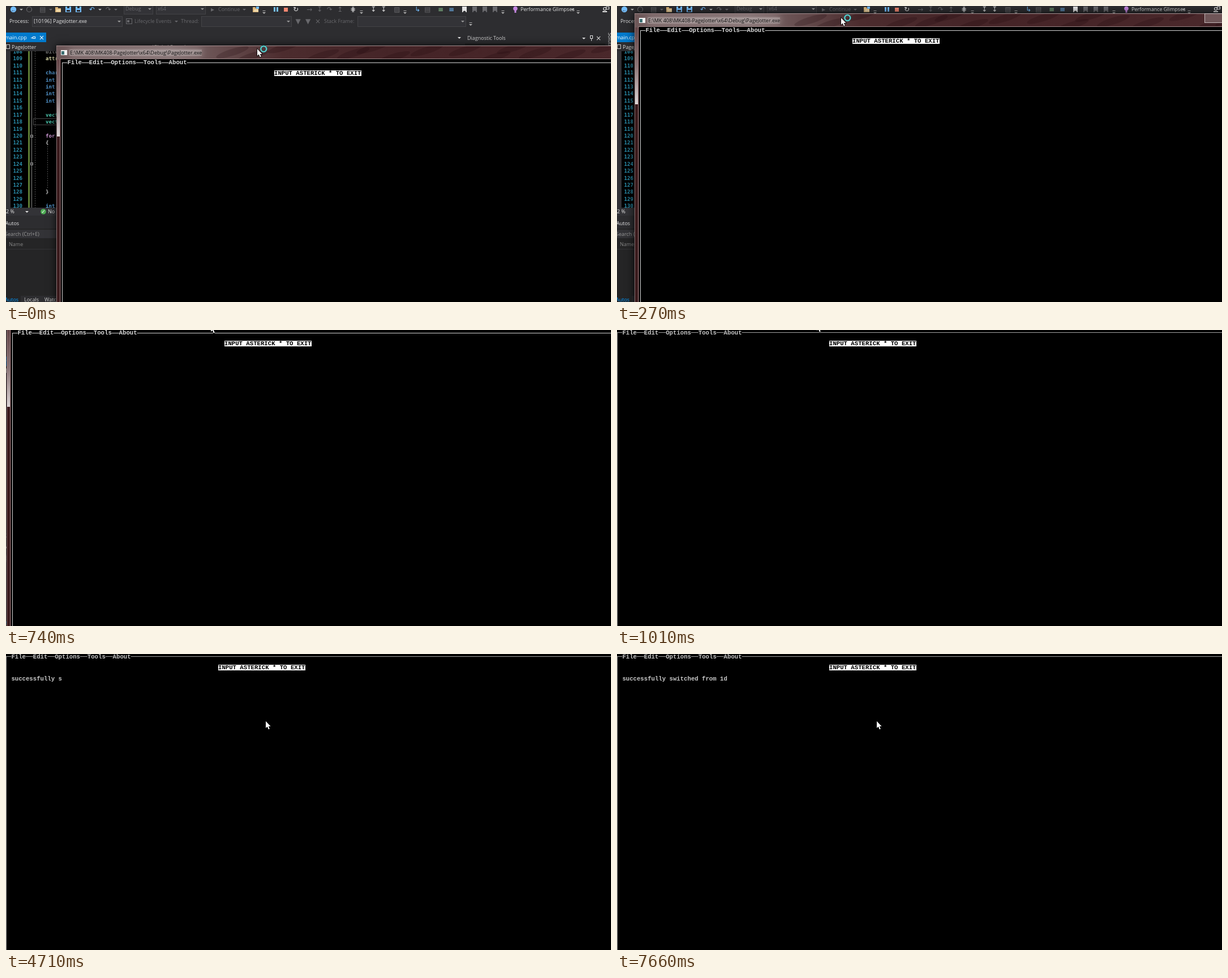
An HTML page with a canvas for the animation above (8000 ms loop, 1069 by 524 pixels).

```html
<!DOCTYPE html>
<html lang="en">
<head>
<meta charset="utf-8">
<style>
html, body { margin: 0; width: 100%; height: 100%; overflow: hidden; background: #000; }
canvas { display: block; }
</style>
</head>
<body>
<canvas id="stage" width="1069" height="524"></canvas>
<script>
const W = 1069, H = 524, LOOP = 8000;
const ctx = document.getElementById('stage').getContext('2d');
const UI = '9px "Open Sans", "Noto Sans", sans-serif';
const ICON = '12px "DejaVu Sans", sans-serif';
const CODE = 'bold 9.1px "DejaVu Sans Mono", monospace';
const TERM = 'bold 10.67px "Liberation Mono", monospace';
const CELL = 6.4;
const DIM = '#68686c', LIGHT = '#e4e4e4', BLUE = '#75bfff', RED = '#f48771', GREEN = '#8dc891';

// The screen refreshes in ticks; both paths are [tick, x, y]
const TICK = 140, MAXIMISED = 6;
const DRAG = [[0, 0, 0], [1, -33, -29], [2, -58, -57], [3, -69, -86], [4, -77, -95], [6, -99, -95]];
const POINTER = [[0, 444, 76], [1, 411, 48], [3, 381, -6], [6, 353, -11], [9, 353, -11], [11, 454, 107], [12, 459, 119]];
const BUSY_UNTIL = 3980;

// [time, characters typed]
const TYPED = 'successfully switched from 1d';
const RHYTHM = [[2590, 0], [2730, 1], [3670, 7], [5140, 17], [6420, 26], [7250, 26.9], [7390, 28], [7660, 29]];

// Values along a path of key points, held at both ends
function along(points, u) {
  const i = points.findIndex(p => p[0] > u);
  if (i < 1) return points.at(i).slice(1);
  const a = points[i - 1], b = points[i];
  const f = (u - a[0]) / (b[0] - a[0]);
  return a.slice(1).map((v, n) => v + (b[n + 1] - v) * f);
}

function rect(x, y, w, h, color) {
  ctx.fillStyle = color;
  ctx.fillRect(x, y, w, h);
}
function frame(x, y, w, h, color) {
  ctx.strokeStyle = color;
  ctx.lineWidth = 1;
  ctx.strokeRect(x + .5, y + .5, w - 1, h - 1);
}
function text(s, x, y, color = LIGHT, font = UI) {
  ctx.font = font;
  ctx.fillStyle = color;
  ctx.fillText(s, x, y);
}
const label = (s, x, y, color) => text(s, x, y + 3.2, color);

function disc(x, y, r, color) {
  ctx.beginPath();
  ctx.arc(x, y, r, 0, 2 * Math.PI);
  ctx.fillStyle = color;
  ctx.fill();
}
function ring(x, y, r, color, width) {
  ctx.beginPath();
  ctx.arc(x, y, r, 0, 2 * Math.PI);
  ctx.strokeStyle = color;
  ctx.lineWidth = width;
  ctx.stroke();
}
function glyph(s, x, y, color = LIGHT, font = ICON) {
  ctx.textAlign = 'center';
  text(s, x, y + 4.3, color, font);
  ctx.textAlign = 'left';
}
function drop(x, y, color = '#b0b0b0') {
  for (let i = 0; i < 3; i++) rect(x - 2.5 + i, y - 1 + i, 5 - 2 * i, 1, color);
}
function overflow(x, y = 11) {
  rect(x - 2.5, y - 3, 5, 1, '#aaa');
  drop(x, y + 1);
}
function combo(s, x, y, w, color) {
  rect(x, y, w, 19, '#333337');
  frame(x, y, w, 19, '#434346');
  drop(x + w - 6, y + 9, '#999');
  label(s, x + 3, y + 9, color);
}

function folder(x) {
  rect(x - 5, 2, 5, 3, '#dcb67a');
  rect(x - 5, 4, 10, 7, '#dcb67a');
  rect(x - 3, 6, 8, 4, '#f0d8a8');
}
function disk(x, color) {
  rect(x - 5, 1, 10, 10, color);
  rect(x - 2, 1, 4, 3, '#2d2d30');
  rect(x - 3, 7, 6, 3, '#2d2d30');
}
function bookmark(x, color) {
  rect(x - 4, 1, 8, 10, color);
  disc(x, 11, 2.5, '#2d2d30');
}
// Evenly spaced toolbar icons: characters or drawing functions
function icons(x, step, list, ...colors) {
  [...list].forEach((icon, i) => {
    const draw = typeof icon === 'string' ? () => glyph(icon, x + i * step, 6, colors[i % colors.length]) : icon;
    draw(x + i * step, colors[i % colors.length]);
  });
}

function mainToolbar() {
  disc(13, 6, 5.2, BLUE);
  glyph('←', 13, 6, '#2d2d30', UI);
  ring(41, 6, 4.5, DIM, 1.2);
  icons(65, 0, '▤', DIM);
  icons(92, 18, [folder, disk, disk], BLUE);
  icons(152, 29, '↶↷', BLUE, DIM);
  combo('Debug', 208, -4, 52, DIM);
  combo('x64', 265, -4, 88, DIM);
  icons(365, 0, '▸', DIM);
  label('Continue', 375, 6, DIM);
  icons(441, 0, [folder]);
  rect(442, 1, 5, 4, BLUE);
  for (const x of [473, 478]) rect(x, 2, 3, 8, BLUE);
  rect(491, 3, 7, 7, RED);
  icons(512, 0, '↻', LIGHT);
  icons(536, 18, '→↧↷↥', DIM);
  icons(613, 0, '⋕', LIGHT);
  icons(649, 18, '↧↧', LIGHT);
  icons(691, 0, '▨', DIM);
  icons(727, 18, '↳▤', BLUE, DIM);
  icons(768, 19, '≡≡', GREEN, BLUE);
  icons(810, 18, [bookmark, bookmark, bookmark, bookmark], LIGHT, DIM, DIM, DIM);
  disc(900, 4.5, 3.8, '#c586e0');
  rect(898.5, 8, 3, 4, '#c586e0');
  label('Performance Glimpses', 909, 6);
  ring(1058, 5, 2.5, LIGHT, 1.2);
  rect(1054, 9, 8, 2, LIGHT);
  frame(1060, 1, 6, 5, LIGHT);
  for (const x of [27, 166, 1001]) drop(x, 6);
  for (const x of [79, 194, 421]) drop(x, 6, DIM);
  for (const x of [456, 628, 705, 878, 1011]) overflow(x);
}

function processToolbar() {
  label('Process:', 6, 27);
  combo('[10196] PageJotter.exe', 46, 18, 160);
  frame(212, 22, 11, 10, DIM);
  rect(214, 25, 4, 4, DIM);
  label('Lifecycle Events', 227, 27, DIM);
  drop(301, 27, DIM);
  label('Thread:', 309, 27, DIM);
  combo('', 345, 18, 160);
  [...'▼▼×'].forEach((s, i) => glyph(s, 516 + i * 17.5, 27, DIM));
  label('Stack Frame:', 562, 27, DIM);
  combo('', 621, 18, 192);
  overflow(821, 32);
}

const KEYWORD = '#569cd6', TYPE = '#4ec9b0', PLAIN = '#c8c8c8';
const LINES = {
  108: ['bitwise', '#777'], 109: ['attron', '#dcdcaa'], 111: ['char', KEYWORD],
  112: ['int', KEYWORD], 113: ['int', KEYWORD], 114: ['int', KEYWORD], 115: ['int', KEYWORD],
  117: ['vector', TYPE], 118: ['vector', TYPE], 120: ['for', '#d8a0df'],
  121: ['{', PLAIN], 128: ['}', PLAIN], 130: ['int', KEYWORD]
};
const lineY = n => 93 + (n - 109) * 12.43;

function dashes(x, from, to) {
  for (let y = from; y < to; y += 4) rect(x, y, 1, 2, '#555');
}
function editor() {
  rect(0, 47, 71, 17, '#007acc');
  label('main.cpp', -2, 56, '#fff');
  rect(44, 56, 3, 1, '#fff');
  frame(47, 54, 5, 4, '#fff');
  glyph('×', 63, 56, '#fff');
  drop(801, 56, LIGHT);
  frame(0, 68, 7, 8, PLAIN);
  label('PageJotter', 10, 73);
  label('(Global Scope)', 258, 73);

  ctx.save();
  ctx.beginPath();
  ctx.rect(0, 80, 806, 277);
  ctx.clip();
  rect(0, 80, 806, 277, '#000');
  rect(0, 80, 8, 277, '#333337');
  rect(39, 80, 3, 277, '#5c7a33');
  rect(45, 80, 1, 277, '#8a8a8a');
  frame(48, lineY(118) - 6, 758, 12, '#4a4a4a');
  dashes(51, 80, 357);
  dashes(73, lineY(121) + 6, lineY(128) - 6);
  for (const n of [120, 124]) {
    const y = Math.round(lineY(n)) - 2;
    rect(43, y, 5, 5, '#000');
    frame(43, y, 5, 5, '#999');
    rect(44, y + 2, 3, 1, '#999');
  }
  for (let n = 108; n <= 130; n++) {
    text(n, 12.5, lineY(n) + 3.3, '#2b91af', CODE);
    const [word = '', color] = LINES[n] || [];
    text(word, 70, lineY(n) + 3.3, color, CODE);
  }
  ctx.restore();
}

function panels() {
  rect(0, 357, 806, 14, '#333337');
  label('2 %', 0, 364);
  drop(37, 364, LIGHT);
  disc(66, 364, 4.8, '#4fae55');
  glyph('✓', 66, 363, '#fff', UI);
  label('No issues found', 74, 364);
  rect(0, 394, 806, 119, '#252526');
  label('Autos', -1, 385);
  rect(0, 396, 806, 15, '#333337');
  label('Search (Ctrl+E)', -2, 404, '#999');
  label('Name', 5, 422, '#858585');
  rect(0, 430, 806, 1, '#333337');
  rect(0, 513, 26, 11, '#252526');
  label('Autos', -2, 520, '#0097fb');
  label('Locals', 32, 520, '#d0d0d0');
  label('Watch 1', 68, 520, '#d0d0d0');

  rect(811, 66, 248, 458, '#252526');
  label('Diagnostic Tools', 815, 57, '#d0d0d0');
  drop(1021, 57, LIGHT);
  frame(1032, 52, 5, 6, LIGHT);
  rect(1034, 58, 1, 4, LIGHT);
  glyph('×', 1047, 57);
  ctx.save();
  ctx.translate(1064, 47);
  ctx.rotate(Math.PI / 2);
  text('Solution', 0, 0, '#d0d0d0');
  ctx.restore();
}

function desktop() {
  rect(0, 0, W, H, '#2d2d30');
  mainToolbar();
  processToolbar();
  editor();
  panels();
}

function gradient(x0, y0, x1, y1, ...colors) {
  const g = ctx.createLinearGradient(x0, y0, x1, y1);
  colors.forEach((c, i) => g.addColorStop(i / (colors.length - 1), c));
  return g;
}

// Glass title bar and left edge, in window coordinates at zero offset
function glass() {
  ctx.save();
  ctx.shadowColor = 'rgba(0,0,0,.85)';
  ctx.shadowBlur = 14;
  rect(89, 70, 1300, 800, '#3a1a1c');
  ctx.restore();

  rect(89, 70, 1300, 25, gradient(89, 0, 1089, 0, '#6e5859', '#7c696a', '#4c2c2e', '#452427', '#472528', '#4a282b'));
  ctx.save();
  ctx.beginPath();
  ctx.rect(90, 71, 1200, 23);
  ctx.clip();
  for (let i = 0; i < 16; i++) {
    ctx.beginPath();
    ctx.ellipse(400 + i * 50 + 15 * Math.sin(i * 5), 82 + 9 * Math.sin(i * 2.3), 30, 6, -.3, 0, 7);
    ctx.fillStyle = 'rgba(30,8,12,.22)';
    ctx.fill();
  }
  ctx.shadowColor = 'rgba(225,215,215,.8)';
  ctx.shadowBlur = 12;
  rect(112, 77, 234, 11, 'rgba(175,165,165,.55)');
  ctx.restore();
  rect(89, 70, 1300, 1, '#a68f90');
  rect(96, 93, 1300, 1, '#9b8485');

  rect(90, 95, 5, 136, gradient(0, 95, 0, 231, '#654648', '#8b7677', '#dcd6d6'));
  rect(89, 71, 1, 700, '#8a7475');
  rect(95, 94, 1, 700, '#8e7778');

  rect(97, 78, 11, 9, '#f2f2f2');
  rect(98, 80, 5, 6, '#3c6f72');
  label('E:\\MK 408\\MK408-PageJotter\\x64\\Debug\\PageJotter.exe', 113, 82.5, '#101010');
  rect(1096, 70, 60, 17, '#c5b8b9');
  rect(1097, 71, 58, 15, '#6f5658');
}

function terminal(maximised, count) {
  const ink = maximised ? '#c8c8c8' : '#dedede';
  const rule = maximised ? '#a0a0a0' : '#d4d4d4';
  const top = maximised ? 99 : 100;
  rect(97, 94, 1300, 800, '#000');
  rect(99, top, 1300, 1, rule);
  rect(99, top, 1, 800, rule);
  const left = 108.4;
  for (const { 0: name, index } of 'File  Edit  Options  Tools  About'.matchAll(/\w+/g)) {
    const x = left + index * CELL;
    rect(x, 96, name.length * CELL, 9, '#000');
    text(name, x, 103, ink, TERM);
  }
  rect(474, 114, 154, 10, '#fff');
  text('INPUT ASTERICK * TO EXIT', 474, 122, '#000', TERM);
  text(TYPED.slice(0, count), left, 142, ink, TERM);
}

function pointer(x, y, busy) {
  if (busy) {
    ring(x + 11.3, y, 5, '#1d7f86', 3);
    ring(x + 11.3, y, 5, '#6fdcd6', 1.6);
  }
  const arrow = new Path2D('M0 0V12L2.8 9.6L4.8 14.5L6.8 13.6L4.8 9H8.6Z');
  ctx.save();
  ctx.translate(x, y);
  ctx.strokeStyle = '#000';
  ctx.lineWidth = 1.4;
  ctx.stroke(arrow);
  ctx.fillStyle = '#fff';
  ctx.fill(arrow);
  ctx.restore();
}

function draw() {
  const t = performance.now() % LOOP;
  const tick = Math.floor((t + 20) / TICK);
  const maximised = tick >= MAXIMISED;
  const [dx, dy] = along(DRAG, tick).map(Math.round);
  const [count] = along(RHYTHM, t);

  if (!maximised) desktop();
  ctx.save();
  ctx.translate(dx, dy);
  if (!maximised) glass();
  terminal(maximised, Math.floor(count + .01));
  ctx.restore();
  if (maximised) rect(0, 0, 0, 0, '#000');
  pointer(...along(POINTER, tick).map(Math.round), t < BUSY_UNTIL);
  requestAnimationFrame(draw);
}
draw();
</script>
</body>
</html>
```
